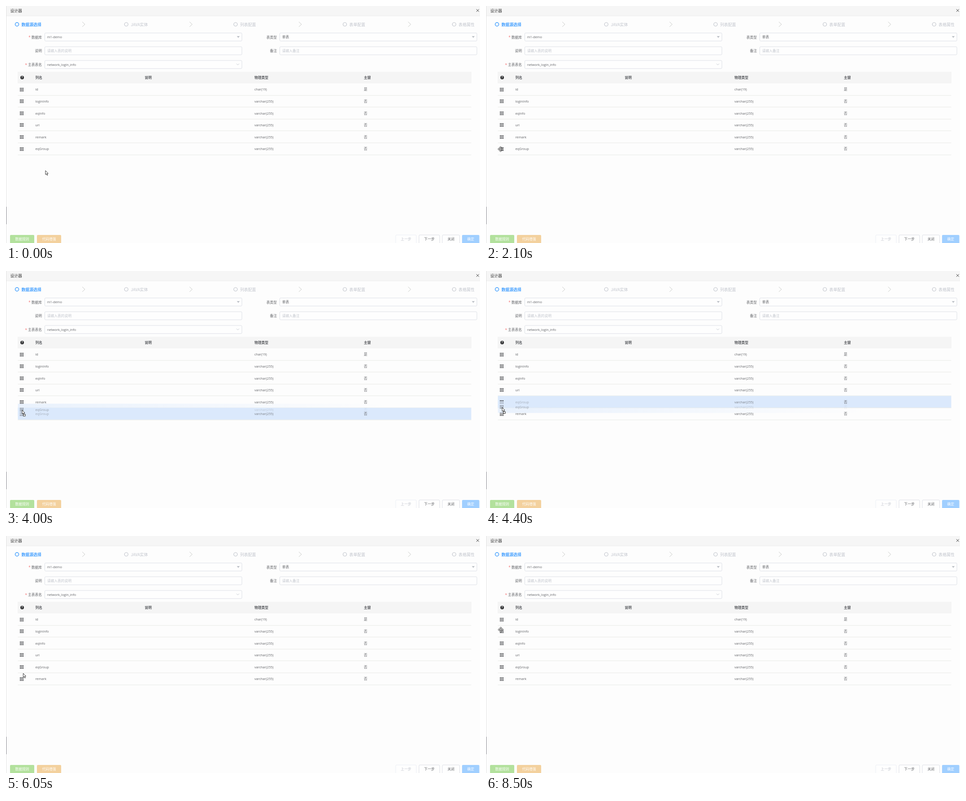
These frames come from a looping animation (1057x530 px, 10 s). An HTML page with a canvas:

```html
<!DOCTYPE html>
<html lang="zh-CN">
<head>
<meta charset="utf-8">
<title>设计器</title>
<style>
html, body { margin: 0; width: 100%; height: 100%; overflow: hidden; background: #fdfdfd; }
canvas { display: block; }
</style>
</head>
<body>
<canvas id="stage" width="1057" height="530"></canvas>
<script>
const ctx = document.getElementById('stage').getContext('2d');
const LOOP = 10000, TICK = 50;
const LATIN = '"Open Sans", "Noto Sans", sans-serif';
const CJK = '"Noto Sans CJK SC", "Noto Sans CJK", "Open Sans", sans-serif';
const INK = '#606266', PALE = '#c0c4cc', BLUE = '#409eff', BORDER = '#dcdfe6', SELECTED = '#dbe9fc';
const ROW_TOP = 173, ROW_H = 26.6, TABLE_X = 26.5, TABLE_W = 1011;
const COLS = [65.5, 309.5, 554, 798];
const SWAP_AT = 4000, SWAP_MS = 150;

const rows = [
  ['id', 'char(19)', '是'],
  ...['loginInfo', 'eqInfo', 'url', 'remark', 'eqGroup'].map(name => [name, 'varchar(255)', '否'])
];

// Pointer path: time, x, y
const path = [
  [0, 88, 368], [150, 88, 368], [800, 58, 338], [1200, 37, 322], [1700, 27, 322],
  [2100, 32.5, 320], [3200, 32.5, 320], [3500, 36, 318.5], [3700, 36, 318.5],
  [4250, 36, 305], [5250, 36, 305], [5300, 35.5, 305.5], [5850, 37, 305.5],
  [6000, 37, 305.5], [6500, 85, 360], [7200, 85, 360], [7550, 33, 288],
  [8300, 33, 288], [8500, 33, 209.5], [LOOP, 33, 209.5]
];
const shapes = [
  [0, arrow], [1300, move], [3250, denied], [3700, dragArrow],
  [5300, move], [5400, arrow], [7450, move]
];

const clamp = v => Math.max(0, Math.min(1, v));
const ease = v => v * v * (3 - 2 * v);
const mix = (a, b, k) => a + (b - a) * k;

function pointerAt(t) {
  const i = path.findIndex(p => p[0] > t);
  const a = path[i - 1], b = path[i];
  const k = ease((t - a[0]) / (b[0] - a[0]));
  return [mix(a[1], b[1], k), mix(a[2], b[2], k)];
}

// y is the visual middle of the line
function text(s, x, y, { color = INK, size = 7.75, weight = 400, align = 'left' } = {}) {
  const latin = /^[\x00-\x7f]+$/.test(s);
  ctx.font = `${weight} ${latin ? size * 0.945 : size}px ${latin ? LATIN : CJK}`;
  ctx.textAlign = align;
  ctx.fillStyle = color;
  ctx.fillText(s, x, y + size * 0.36);
}

function fill(x, y, w, h, color) {
  ctx.fillStyle = color;
  ctx.fillRect(x, y, w, h);
}

function box(x, y, w, h, bg, border) {
  ctx.beginPath();
  ctx.roundRect(x, y, w, h, 2);
  ctx.fillStyle = bg;
  ctx.fill();
  if (border) {
    ctx.lineWidth = 1;
    ctx.strokeStyle = border;
    ctx.stroke();
  }
}

function trace(points, closed) {
  ctx.beginPath();
  points.forEach(([x, y]) => ctx.lineTo(x, y));
  if (closed) ctx.closePath();
}

function line(points, color, width = 1) {
  trace(points);
  ctx.strokeStyle = color;
  ctx.lineWidth = width;
  ctx.stroke();
}

function circle(x, y, r, color, width) {
  ctx.beginPath();
  ctx.arc(x, y, r, 0, Math.PI * 2);
  if (width) {
    ctx.lineWidth = width;
    ctx.strokeStyle = color;
    ctx.stroke();
  } else {
    ctx.fillStyle = color;
    ctx.fill();
  }
}

function header() {
  fill(0, 0, 1057, 22, '#f6f6f6');
  fill(0, 21.5, 1057, 1, '#eeeeee');
  text('设计器', 9.5, 10.5, { size: 8.7, color: '#333' });
  line([[1048.8, 7], [1054.8, 13]], '#444');
  line([[1054.8, 7], [1048.8, 13]], '#444');
}

function steps() {
  const names = ['数据源选择', 'JAVA实体', '列表配置', '表单配置', '表格属性'];
  names.forEach((name, i) => {
    const x = 24.5 + i * 243.7, on = i === 0;
    circle(x, 41, 4, on ? BLUE : PALE, on ? 1.5 : 1.2);
    text(name, x + 10, 41.3, { size: 8.9, color: on ? BLUE : PALE, weight: on ? 700 : 400 });
  });
  [170, 409.3, 653, 896.7].forEach(x =>
    line([[x, 35.5], [x + 6, 41], [x, 46.5]], '#c9cbc8'));
}

function field(right, y, label, value, { hint, required, mark } = {}) {
  const x = right + 6.5;
  text(label, right, y + 0.5, { align: 'right' });
  if (required) text('*', right - label.length * 7.75 - 6.5, y + 0.8, { color: '#f56c6c', size: 8.5 });
  box(x, y - 9, 439.5, 18, '#fefefe', BORDER);
  text(value, x + 5.2, y + 0.2, { color: hint ? PALE : INK });
  const m = x + 431.5;
  if (mark === 'solid') {
    trace([[m - 3.3, y - 1.7], [m + 3.3, y - 1.7], [m, y + 1.8]], true);
    ctx.fillStyle = '#b4b8bf';
    ctx.fill();
  } else if (mark === 'thin') {
    line([[m - 4, y - 2], [m - 1, y + 1], [m + 2, y - 2]], PALE, 0.9);
  }
}

function form() {
  field(80, 69.3, '数据库', 'm1-demo', { required: true, mark: 'solid' });
  field(80, 100.1, '说明', '请输入表的说明', { hint: true });
  field(80, 130.9, '主表表名', 'network_login_info', { required: true, mark: 'thin' });
  field(604, 69.3, '表类型', '单表', { mark: 'solid' });
  field(604, 100.1, '备注', '请输入备注', { hint: true });
}

function rowContent([name, type, key], y, alpha = () => 1) {
  const put = (x, draw) => {
    ctx.globalAlpha = alpha(x);
    draw(x);
  };
  put(31, x => {
    for (let i = 0; i < 9; i++) {
      fill(x + (i % 3) * 3, Math.round(y) - 4 + Math.floor(i / 3) * 3, 2, 2, '#3c3e42');
    }
  });
  put(COLS[0], x => text(name, x, y));
  put(COLS[2], x => text(type, x, y));
  put(COLS[3], x => text(key, x, y));
  ctx.globalAlpha = 1;
}

function table(t) {
  fill(TABLE_X - 0.5, 147, TABLE_W + 1, 26, '#f5f5f5');
  circle(36, 160, 4, '#303133');
  text('?', 36, 160.1, { color: '#fff', size: 6.5, weight: 700, align: 'center' });
  ['列名', '说明', '物理类型', '主键'].forEach((s, i) =>
    text(s, COLS[i], 160, { weight: 700, color: '#5a5c60' }));

  const swapped = ease(clamp((t - SWAP_AT) / SWAP_MS));
  const dragging = t >= 3250 && t < 5400;
  rows.forEach((row, i) => {
    const slot = i === 5 ? 5 - swapped : i === 4 ? 4 + swapped : i;
    const top = ROW_TOP + slot * ROW_H;
    if (i === 5 && dragging) fill(TABLE_X, top, TABLE_W, ROW_H, SELECTED);
    fill(TABLE_X, Math.round(top + ROW_H) - 0.5, TABLE_W, 1, '#e8eae6');
    rowContent(row, top + 13.6);
  });
}

// Translucent copy of the dragged row, fading to the right
function ghost(y) {
  const fade = ctx.createLinearGradient(TABLE_X, 0, 850, 0);
  fade.addColorStop(0, 'rgba(219,233,252,.6)');
  fade.addColorStop(1, 'rgba(219,233,252,0)');
  fill(TABLE_X, y - 13.3, TABLE_W, ROW_H, fade);
  rowContent(rows[5], y, x => 0.6 * clamp(1 - x / 950));
}

function button(x, w, label, bg, color, border) {
  box(x, 512, w, 24, bg, border);
  text(label, x + w / 2, 521.7, { color, align: 'center' });
}

function footer() {
  button(9, 54, '数据规则', '#b3e19d', '#fff');
  button(69, 54, '代码增强', '#f3d19e', '#fff');
  button(869, 46, '上一步', '#fefefe', PALE, '#ebeef5');
  button(921, 46, '下一步', '#fefefe', INK, BORDER);
  button(973, 38.5, '关闭', '#fefefe', INK, BORDER);
  button(1017, 38.5, '确定', '#a0cfff', '#fff');
}

function outlined(points, width = 0.9) {
  trace(points, true);
  ctx.fillStyle = '#fff';
  ctx.fill();
  ctx.strokeStyle = '#222';
  ctx.lineWidth = width;
  ctx.stroke();
}

function arrow() {
  outlined([[0, 0], [0, 9], [2, 7.2], [3.6, 10.6], [5, 10], [3.5, 6.7], [6, 6.4]]);
}

function dragArrow() {
  arrow();
  ctx.fillStyle = '#fff';
  ctx.fillRect(2.5, 9, 5, 5);
  ctx.strokeStyle = '#222';
  ctx.lineWidth = 1;
  ctx.strokeRect(2.5, 9.5, 4.5, 4);
}

function move() {
  const arm = [[-0.8, -0.8], [-0.8, -3.6], [-2.4, -3.6], [0, -6.2], [2.4, -3.6], [0.8, -3.6]];
  const points = [];
  for (let q = 0; q < 4; q++) {
    const c = Math.round(Math.cos(q * Math.PI / 2)), s = Math.round(Math.sin(q * Math.PI / 2));
    arm.forEach(([x, y]) => points.push([x * c - y * s, x * s + y * c]));
  }
  outlined(points, 0.8);
}

function denied() {
  circle(0, 0, 5.6, '#fff');
  circle(0, 0, 4.4, '#111', 1.5);
  line([[-3.1, -3.1], [3.1, 3.1]], '#111', 1.5);
}

function pointer(t, x, y) {
  ctx.save();
  ctx.translate(x, y);
  shapes.findLast(s => s[0] <= t)[1]();
  ctx.restore();
}

function draw(t) {
  fill(0, 0, 1057, 530, '#fdfdfd');
  header();
  steps();
  form();
  table(t);
  footer();
  fill(0, 0, 1, 530, '#e2e2e2');
  fill(0, 449, 1, 39, '#85858c');
  const [x, y] = pointerAt(t);
  if (t >= 3700 && t < 5300) ghost(y - 0.8);
  pointer(t, x, y);
}

const start = performance.now();
function frame() {
  const t = (performance.now() - start) % LOOP;
  draw(Math.floor(t / TICK) * TICK);
  requestAnimationFrame(frame);
}
frame();
</script>
</body>
</html>
```
